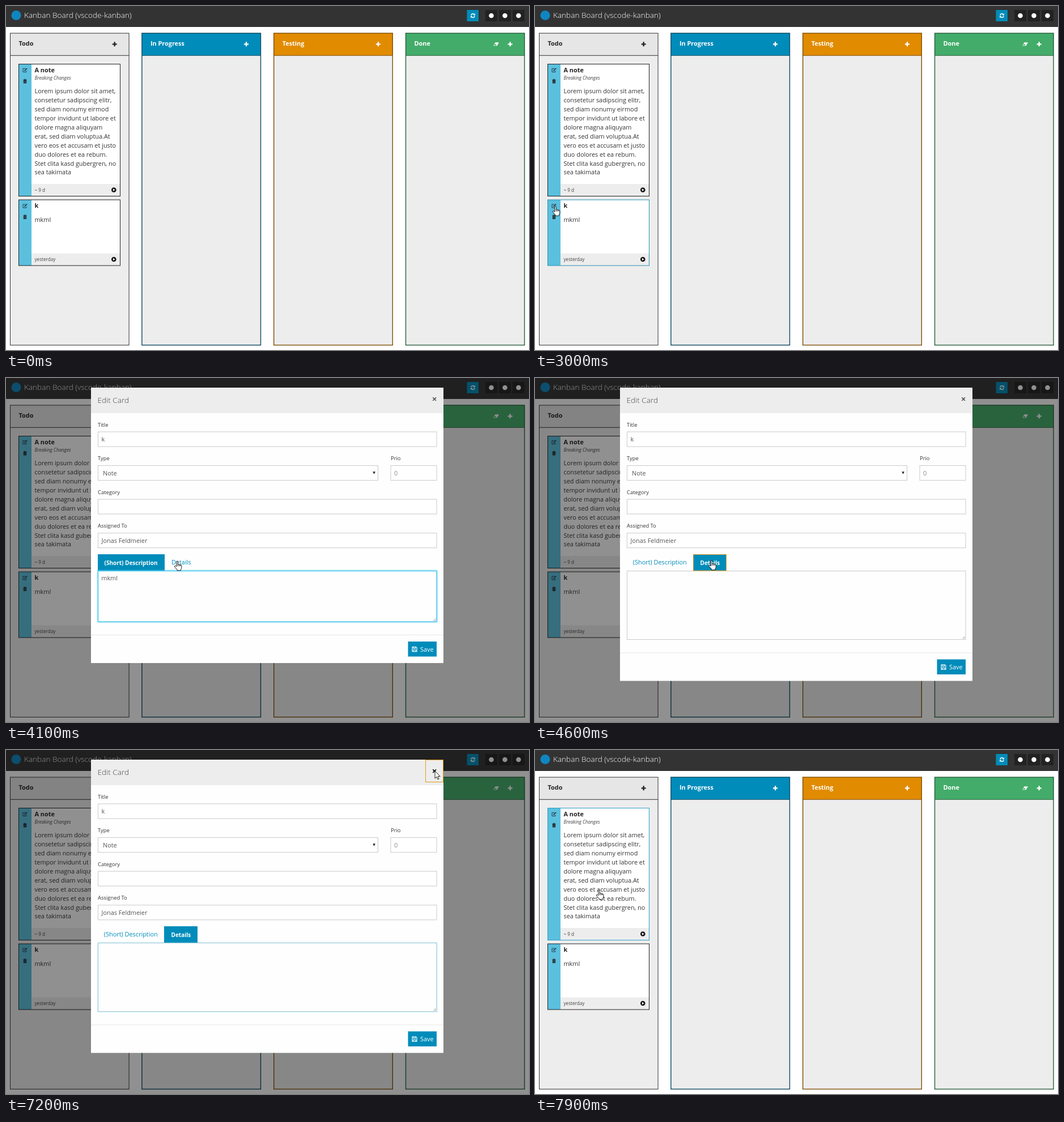
Recreate the animation shown at these times as an HTML page. Size 923 by 607 pixels, loop 8000 ms.

```html
<!DOCTYPE html>
<html lang="en">
<head>
<meta charset="utf-8">
<title>Kanban Board</title>
<style>
html, body { margin: 0; width: 100%; height: 100%; overflow: hidden; background: #fff; }
svg { display: block; width: 923px; height: 607px; font: 10.88px "Open Sans", "Noto Sans", sans-serif; fill: #333; }
text { white-space: pre; }
.b { font-weight: 700; }
.light { font-weight: 300; font-size: 13.6px; }
.small { font-size: 8.16px; fill: #444; }
.label { font-size: 9.4px; }
.tab { font-size: 10px; font-weight: 700; }
</style>
</head>
<body>
<svg id="stage" viewBox="0 0 923 607"></svg>
<script>
const BLUE = '#008cba', INK = '#222', FOCUS = '#e39a1c';

const rect = (x, y, w, h, fill, more = '') =>
  `<rect x="${x}" y="${y}" width="${w}" height="${h}" fill="${fill}" ${more}/>`;
const frame = (x, y, w, h, fill, stroke, more = '') =>
  rect(x, y, w, h, fill, `stroke="${stroke}" ${more}`);
const text = (x, y, s, cls = '', fill = '') =>
  `<text x="${x}" y="${y}" class="${cls}" ${fill && `style="fill:${fill}"`}>${s}</text>`;
const path = (d, more) => `<path d="${d}" ${more}/>`;
const at = (x, y, body, more = '') => `<g transform="translate(${x} ${y})" ${more}>${body}</g>`;
const dot = (x, y, r, fill) => `<circle cx="${x}" cy="${y}" r="${r}" fill="${fill}"/>`;

const plus = (x, color) => at(x, 67.3, path('M-4 0H4M0-4V4', `stroke="${color}" stroke-width="2.3"`));
const edit = y => at(33.5, y,
  path('M2.5 1V3H-3.5V-3H1', 'fill="none" stroke="#234" stroke-width=".9"') +
  path('M-1 1L3.7-3.5', 'stroke="#234" stroke-width="1.7"'));
const trash = y => at(33.5, y,
  path('M-3-2.6H3M-1-3.5H1', 'stroke="#222" stroke-width="1.1"') +
  path('M-2.6-1.8H2.6V3.6H-2.6Z', 'fill="#222"') +
  path('M-.9-.8V2.6M.9-.8V2.6', 'stroke="#5bc0de" stroke-width=".5"'));
const play = y => at(190.3, y, dot(0, 0, 4.3, '#111') + path('M-1.4-2.3L2.4 0L-1.4 2.3Z', 'fill="#fff"'));

function column(x, title, head, border, ink, width) {
  return rect(x, 48, 209.6, 550.4, '#ededed') + rect(x, 48, 209.6, 39, head) +
    path(`M${x} 87.3h209.6`, `stroke="${border}"`) +
    frame(x, 48, 209.6, 550.4, 'none', border, `stroke-width="${width}"`) +
    text(x + 15, 69.5, title, 'b', ink) + plus(x + 184.2, ink);
}

function card(id, y, h, title, age, body) {
  return rect(22.5, y, 179, h, '#fff') + rect(22.5, y, 22.5, h, '#5bc0de') +
    rect(45, y + h - 21.5, 156.5, 21.5, '#ededed') +
    frame(22.5, y, 179, h, 'none', INK, `id="${id}"`) +
    edit(y + 11) + trash(y + 30.3) + play(y + h - 11) +
    text(50.5, y + 14.3, title, 'b', INK) + text(50.5, y + h - 8, age, 'small') + body;
}

const lorem = ['Lorem ipsum dolor sit amet,', 'consetetur sadipscing elitr,', 'sed diam nonumy eirmod',
  'tempor invidunt ut labore et', 'dolore magna aliquyam', 'erat, sed diam voluptua.At',
  'vero eos et accusam et justo', 'duo dolores et ea rebum.', 'Stet clita kasd gubergren, no', 'sea takimata'];

const refresh = at(824, 17,
  path('M-3.2-.8A3.3 3.3 0 0 1 2.4-2.3M3.2 .8A3.3 3.3 0 0 1-2.4 2.3', 'fill="none" stroke="#fff" stroke-width="1.5"') +
  path('M4-4V-.6H.6ZM-4 4V.6H-.6Z', 'fill="#fff"'));
const eraser = at(865, 67.3,
  path('M-1.5-3H5L1.5 3H-5Z', 'fill="#fff"') +
  path('M-2.9 .3H1L-.4 2.2H-4Z', 'fill="#43ac6a"'));

const board =
  rect(0, 0, 923, 37, '#333') + dot(18, 16.5, 8.5, '#0f86c1') +
  text(32, 21, 'Kanban Board (vscode-kanban)', 'light', '#fff') +
  rect(813.5, 7, 20.5, 20, BLUE) + refresh +
  [846, 870, 894].map(x => rect(x, 7, 21, 20, INK) + dot(x + 10.5, 17, 4.3, '#fff')).join('') +
  column(7.5, 'Todo', '#e6e6e6', '#333', INK, 1) +
  column(239.9, 'In Progress', BLUE, '#0b4a60', '#fff', 1.4) +
  column(472.7, 'Testing', '#e18b00', '#805005', '#fff', 1.4) +
  column(705.5, 'Done', '#43ac6a', '#28603d', '#fff', 1.4) + eraser +
  card('card1', 102.5, 233, 'A note', '~ 9 d',
    text(50.5, 130, 'Breaking Changes', 'small" font-style="italic') +
    lorem.map((s, i) => text(50.5, 154 + i * 15.94, s)).join('')) +
  card('card2', 342, 116, 'k', 'yesterday', text(50.5, 380.5, 'mkml'));

const input = (x, y, w, value, fill = '#555') =>
  frame(x, y, w, 26, '#fff', '#cacaca') + text(x + 6, y + 17.2, value, '', fill);

const floppy = at(721, 478.6,
  path('M-4-4H2.5L4-2.5V4H-4Z', 'fill="none" stroke="#fff" stroke-width="1.1"') +
  path('M-2-4V-1.2H1.6V-4M-2.4 4V1.2H2.4V4', 'fill="none" stroke="#fff"'));

const dialog =
  rect(0, 0, 923, 607, '#0a0a0a', 'opacity=".45"') +
  rect(150, 17, 622, 486, '#fefefe', 'id="sheet"') + rect(150, 17, 622, 45, '#ededed') +
  text(161.5, 44, 'Edit Card', 'light', '#444') +
  path('M753.3 34.3L759 40M759 34.3L753.3 40', 'id="cross" stroke-width="1.7"') +
  text(162, 85.5, 'Title', 'label') + input(162.5, 95, 597.5, 'k') +
  text(162, 145, 'Type', 'label') + input(162.5, 154.5, 494, '') + text(171, 171.7, 'Note', '', '#555') +
  path('M647.3 165.2h4.6l-2.3 4.6z', 'fill="#222"') +
  text(679, 145, 'Prio', 'label') + input(679, 154.5, 81, '0', '#888') +
  text(162, 204.5, 'Category', 'label') + input(162.5, 214, 597.5, '') +
  text(162, 264, 'Assigned To', 'label') + input(162.5, 273.7, 597.5, 'Jonas Feldmeier') +
  `<g id="shortTab">${rect(162, 311, 118, 29, BLUE)}${text(173.5, 329.5, '(Short) Description', 'tab', '#fff')}
    ${text(292, 329.3, 'Details', '', BLUE)}</g>
  <g id="detailTab">${text(172.8, 329.3, '(Short) Description', '', BLUE)}${rect(279, 311, 59, 29, BLUE)}
    ${text(291.5, 329.5, 'Details', 'tab', '#fff')}</g>` +
  frame(162.5, 340.5, 597.5, 89.5, '#fefefe', '#cacaca', 'id="area"') +
  text(168.3, 357.3, 'mkml', '" id="areaText', '#555') +
  path('M0 346.5V360', 'id="caret" stroke="#222"') +
  frame(279.5, 311.5, 58, 28.5, 'none', FOCUS, 'id="tabRing"') +
  frame(740.5, 17.5, 31, 39, 'none', FOCUS, 'id="crossRing"') +
  `<g id="foot">${path('M754.5 428.5l4-4M757 428.5l1.5-1.5', 'stroke="#777" stroke-width=".8"')}
    ${path('M150 453.5H772', 'stroke="#e6e6e6"')}
    ${rect(709.5, 465, 50.5, 26.5, BLUE)}${floppy}${text(731, 482.8, 'Save', '', '#fff')}</g>`;

// Pointer shapes, each with its hot spot at the origin
const pointers =
  path('M0 0V16.5L3.8 13L6.3 18.6L8.8 17.5L6.3 12H11.5Z', 'id="arrow" fill="#fff" stroke="#000" stroke-width="1.1"') +
  `<g id="hand" transform="translate(-6.5 0)" stroke="#000" stroke-width="1.1">
    ${path('M5 13V2Q5 .5 6.5 .5T8 2V8Q9.5 6.5 11 8.3Q12.5 7.5 13.7 9.2Q16.2 9 16.3 11V15Q16 18 14.5 19V21.5H6.5V19.5L1 13.5Q0 11.5 1.5 11T5 13Z', 'fill="#fff"')}
    ${path('M8 8V12M11 8.3V12M13.7 9.2V12', 'fill="none"')}</g>` +
  path('M-3.5-8H-1L0-7L1-8H3.5M0-7V7M-3.5 8H-1L0 7L1 8H3.5', 'id="beam" fill="none" stroke="#111" stroke-width="1.3"');

stage.innerHTML = board + `<g id="dialog">${dialog}</g><g id="pointer">${pointers}</g>`;
const el = id => document.getElementById(id);
const set = (id, attrs) => { for (const k in attrs) el(id).setAttribute(k, attrs[k]); };
const show = (id, on) => { el(id).style.display = on ? '' : 'none'; };

// Time, x, y of the pointer's hot spot
const track = [
  [500, 697, 438], [900, 101, 526], [1100, 101, 526], [1500, 97, 384], [2200, 97, 384],
  [3000, 36, 353], [3300, 35, 352.5], [4200, 311.5, 321.5], [5300, 311.5, 321.5], [5600, 248, 371],
  [6100, 248, 371], [6900, 794, 34], [7100, 757, 37], [7200, 757, 37], [7800, 211, 284], [7900, 113, 246.5]
];
const clamp = v => Math.max(0, Math.min(1, v));
const ease = v => (v = clamp(v), v * v * (3 - 2 * v));

function pointerAt(t) {
  const i = track.findIndex(k => k[0] > t);
  if (i < 0) return track[track.length - 1].slice(1);
  if (i === 0) return track[0].slice(1);
  const [t0, x0, y0] = track[i - 1], [t1, x1, y1] = track[i];
  const p = ease((t - t0) / (t1 - t0));
  return [x0 + (x1 - x0) * p, y0 + (y1 - y0) * p];
}

function pointerKind(x, y, open, bottom) {
  const within = (l, t, r, b) => x >= l && x <= r && y >= t && y <= b;
  if (!open) return within(22, 102, 202, 336) || within(22, 341, 202, 458) ? 'hand' : 'arrow';
  if (within(162, 311, 338, 340)) return 'hand';
  const fields = [[95, 121], [154, 181], [214, 240], [273, 300], [340, bottom]];
  return fields.some(([a, b]) => within(162, a, 760, b)) ? 'beam' : 'arrow';
}

function draw(t) {
  const between = (a, b) => t >= a && t < b;
  const open = between(3300, 7300), details = t >= 4500;
  const grow = details ? 31.5 : 0;
  const [x, y] = pointerAt(t);

  set('card1', { stroke: t >= 7800 ? '#2a9fca' : INK });
  set('card2', { stroke: between(1300, 3400) ? '#2a8fb0' : INK });

  show('dialog', open);
  show('shortTab', !details);
  show('detailTab', details);
  show('areaText', !details);
  set('sheet', { height: 486 + grow });
  set('foot', { transform: `translate(0 ${grow})` });

  const [focus, blur] = details ? [5550, 7050] : [3200, 4400];
  const glow = ease((t - focus) / 250) * (1 - ease((t - blur) / 250));
  const mix = (a, b) => Math.round(a + (b - a) * glow);
  set('area', { height: 89.5 + grow, stroke: `rgb(${mix(202, 81)},${mix(202, 203)},${mix(202, 238)})`, 'stroke-width': 1 + .5 * glow });
  el('area').style.filter = glow > 0 ? `drop-shadow(0 0 1.8px rgba(81,203,238,${glow}))` : '';

  const start = details ? 5600 : 3200;
  show('caret', t >= start && t < blur && (t - start) % 1000 < 500);
  set('caret', { transform: `translate(${details ? 168.5 : 197.5} 0)` });
  show('tabRing', between(4400, 5600));
  show('crossRing', t >= 7100);
  set('cross', { stroke: t >= 7000 ? '#000' : '#555' });

  show('pointer', t >= 500);
  set('pointer', { transform: `translate(${x} ${y}) scale(.8)` });
  const kind = pointerKind(x, y, open, 430 + grow);
  for (const k of ['arrow', 'hand', 'beam']) show(k, k === kind);
}

function tick(now) {
  draw(Math.floor(now % 8000 / 100) * 100);
  requestAnimationFrame(tick);
}
draw(0);
requestAnimationFrame(tick);
</script>
</body>
</html>
```
